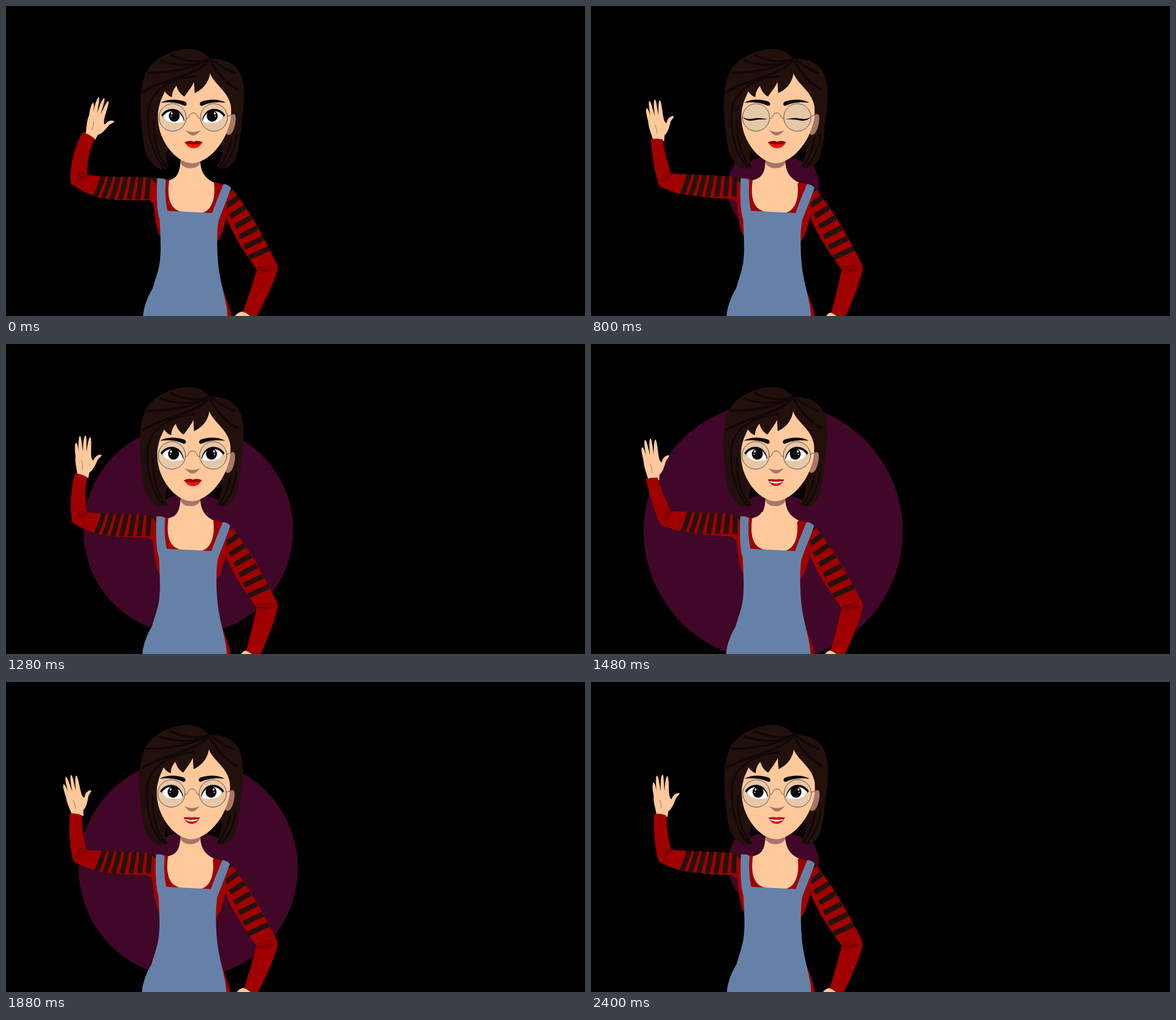
An HTML page with a canvas that plays this animation: 1022x548 px, repeating every 2440 ms.

```html
<!DOCTYPE html>
<html lang="en">
<head>
<meta charset="utf-8">
<title>Waving woman</title>
<style>
html, body { margin: 0; width: 100%; height: 100%; overflow: hidden; background: #000; }
canvas { display: block; }
</style>
</head>
<body>
<canvas id="stage" width="1022" height="548"></canvas>
<script>
const c = document.getElementById('stage').getContext('2d');
const LOOP = 2440, SWING = 1040;
const SKIN = '#ffc99c', SHADE = '#a6776a', RED = '#a00000', FOLD = '#740000';
const HAIR = '#22100c', STRAND = '#120708', STRIPE = '#22120e', INK = '#0b0608';
const APRON = '#6681a8', FRAME = '#4c372c';

const lerp = (a, b, u) => a + (b - a) * u;
const ease = u => (1 - Math.cos(Math.PI * Math.min(1, Math.max(0, u)))) / 2;

// Blend two path strings of the same structure.
function mix(a, b, u) {
  const to = b.match(/-?[\d.]+/g);
  let i = 0;
  return a.replace(/-?[\d.]+/g, n => lerp(+n, +to[i++], u).toFixed(2));
}

// Value at time t from [time, value] keys.
function track(keys, t, curve = u => u) {
  let i = 1;
  while (i < keys.length - 1 && t > keys[i][0]) i++;
  const [t0, a] = keys[i - 1], [t1, b] = keys[i];
  return lerp(a, b, curve((t - t0) / (t1 - t0)));
}

function fill(d, color) {
  c.fillStyle = color;
  c.fill(new Path2D(d));
}

function line(d, color, width) {
  c.strokeStyle = color;
  c.lineWidth = width;
  c.stroke(new Path2D(d));
}

function disc(x, y, rx, ry, color) {
  c.fillStyle = color;
  c.beginPath();
  c.ellipse(x, y, rx, ry, 0, 0, 7);
  c.fill();
}

function group(draw, ...m) {
  c.save();
  c.transform(...m);
  draw();
  c.restore();
}

function clipped(d, draw) {
  c.save();
  c.clip(new Path2D(d));
  draw();
  c.restore();
}

const growth = [[0, 0], [800, 81], [1600, 254.5], [2440, 72]];
const handTurn = [[0, 16], [320, -13], [560, -26], [800, -9], [1040, 4], [1280, 0],
  [1680, -16], [2080, -10], [2400, -3], [2440, 0]];

const sleeve = [
  'M135,223 C120,250 112,285 114,313 C125,323 148,334 165,339 C195,344 225,344 252,343 L262,350 L266,304 C235,301 170,304 143,298 C143,275 148,250 157,235 C150,229 143,225 135,223Z',
  'M88,243 C100,270 112,300 124,320 C130,322 148,328 160,329 C190,334 220,337 247,340 L258,348 L264,304 C235,297 170,296 140,295 C130,278 118,260 109,237 C102,237 95,239 88,243Z'
];
const elbowFolds = [
  'M121,310 C130,301 136,302 144,297 M125,301 C130,294 135,296 139,293 M124,311 C132,308 137,304 142,300',
  'M125,311 C132,301 136,297 143,295 M127,302 C130,296 134,295 139,292 M130,313 C134,306 138,301 142,298'
];
const lowerArm = [
  'M443,464 C436,490 426,520 418,541 C425,542 429,545 432,548 L443,548 C456,523 472,492 480,464Z',
  'M443,464 C437,490 431,520 424,543 C429,544 432,546 434,548 L450,548 C461,523 474,492 480,464Z'
];
const hipHand = ['M404,548 C408,543 413,540 420,540 L433,549Z', 'M416,548 C418,545 420,543 424,542 L436,549Z'];
const upperArm = 'M397,321 C425,353 456,410 478,456 C482,463 477,474 472,478 L444,468 C428,446 404,412 389,375 L391,340Z';

function drawHand() {
  fill('M-9,1 C-10,-12 -14,-22 -12.500,-35 C-14,-45 -14,-56 -12,-58 C-9,-58 -8,-50 -6.500,-40 C-8,-55 -7,-69 -5,-70 C-2,-70 -1.500,-55 0.500,-42 C0.500,-56 2.500,-71 5,-71 C7.500,-71 6.500,-55 7,-42 C8.500,-55 11,-68 13.500,-68 C16,-67 15,-50 15,-39 C15,-31 17,-27 19,-27 C22,-35 28,-38 33,-37 C35,-35 28,-31 26,-27 C22,-17 17,-8 12,-6 L10,4Z', SKIN);
  line('M-2,-27 C0,-22 0,-15 -1,-11', SHADE, 1);
}

function drawWavingArm(p, turn) {
  const a = turn * Math.PI / 180, cos = Math.cos(a), sin = Math.sin(a);
  group(drawHand, cos, sin, -sin, cos, lerp(149, 101, p), lerp(230, 240, p));
  const d = mix(...sleeve, p);
  fill(d, RED);
  clipped(d, () => {
    const y = lerp(300, 292, p);
    for (let i = 0; i < 7; i++) {
      const top = lerp(172, 176, p) + 13.3 * i;
      const foot = lerp(155, 162, p) + 15.5 * i;
      line(`M${top},${y} Q${lerp(top, foot, .35)},${y + 20} ${foot},${y + 42}`, STRIPE, 8.5);
    }
    line('M258,303 L267,313', STRIPE, 5);
  });
  line(mix(...elbowFolds, p), FOLD, 2);
}

function drawHipArm(p, q) {
  fill(mix(...hipHand, q), SKIN);
  fill(mix(...lowerArm, q), RED);
  const k = 4 * p / 140;
  group(() => {
    fill(upperArm, RED);
    clipped(upperArm, () => {
      for (let i = -1; i < 6; i++) {
        line(`M${412 + 10.5 * i},${337 + 18.3 * i} L${388 + 8 * i},${354 + 18.2 * i}`, STRIPE, 9);
      }
    });
  }, 1, 0, k, 1, -465 * k, 0);
  line('M445,461 C454,464 461,457 469,459 M443,466 C455,468 465,464 476,463 M446,471 C455,472 463,467 469,466', FOLD, 2.2);
}

function drawTorso() {
  fill('M262,306 C275,303 282,306 290,308 L369,312 C380,313 392,318 400,326 L388,378 C384,395 380,408 373,416 L374,470 C380,500 392,520 398,548 L280,548 L276,412 L271,405 C264,390 262,365 260,346 L254,342Z', RED);
  fill('M305,297 C302,303 296,306 288,308 C285,330 285,360 312,364 L345,366 C366,361 370,335 367,312 C357,309 351,305 348,297Z', SKIN);
  fill('M267,305 C272,304 279,305 282,308 C280,330 282,350 285,362 L364,366 C370,348 378,330 384,315 C390,315 396,319 397,322 C390,342 380,365 375,380 C372,400 372,425 374,450 C377,490 390,520 391,548 L242,548 C243,530 252,510 259,499 C267,470 272,465 273,430 C273,410 272,390 271,376 C266,360 266,330 267,305Z', APRON);
}

function drawStraps() {
  fill('M267,305 C272,304 279,305 282,308 C280,330 282,350 285,362 L271,376 C266,360 266,330 267,305Z', APRON);
  fill('M384,315 C390,315 396,319 397,322 C390,342 380,365 375,380 L364,366 C370,348 378,330 384,315Z', APRON);
}

function drawNeck() {
  fill('M308,268 L343,268 C342,291 350,304 367,312 L345,330 L305,330 L288,308 C304,304 308,290 308,268Z', SKIN);
  fill('M308,268 L343,268 L343,277 C338,290 313,290 308,277Z', SHADE);
}

function drawEye(shut) {
  disc(294, 197, 24, 24.3, '#e6c8a8');
  c.strokeStyle = FRAME;
  c.lineWidth = .9;
  c.stroke();
  fill('M273,171 C285,164 302,164 316,169 C321,172 319,178 314,176 C303,171 290,169 273,171Z', INK);
  if (shut) {
    fill('M270,196 C278,201 285,200 292,198.500 C300,197 307,199 315,200 C307,201 300,200 293,201.500 C284,204 276,203 270,196Z', INK);
    return;
  }
  fill('M274,193 C280,183 290,181 297,182 C307,184 313,192 315,203 L300,200 L279,198Z', INK);
  fill('M277,195 C283,187 290,185 297,186 C306,187.500 312,194 314,204 C304,208.500 285,209 277,195Z', '#fff');
  disc(297, 194.5, 9.7, 10, INK);
  disc(292.5, 190, 1.7, 2, '#fff');
  disc(291.5, 195, 1, 1.2, '#ccc');
}

function drawMouth(smile) {
  if (smile) {
    fill('M316,240 C322,238 327,239 330,239.500 C334,238 339,239 344,240 C341,247 336,251 330,251 C324,251 319,247 316,240Z', '#d4141b');
    fill('M318,242 C325,244 336,244 342,242 C338,248 322,248 318,242Z', '#fff');
    line('M316,240 C324,243 336,243 344,240', '#8e0008', 1.6);
  } else {
    fill('M315,241 C322,244 340,244 347,241 C343,248 337,251.500 331,251.500 C325,251.500 320,248 315,241Z', '#f5120f');
    fill('M315,241 C322,238 327,238 331,240 C336,238 341,238 347,241 C340,246 322,246 315,241Z', '#8e0000');
  }
}

function drawHead(t) {
  fill('M360,93 C350,80 335,75 318,76 C285,79 256,97 246,120 C236,145 236,180 239,205 C241,235 244,262 253,272 C260,282 268,287 276,290 L275,285 L283,290 L282,285 L289,287 C283,278 280,270 285,255 L330,200 L383,250 C383,265 378,275 371,285 L377,284 L376,288 L384,285 L383,288 C395,285 403,277 406,268 C415,240 414,220 417,200 C423,160 421,140 416,125 C408,103 390,93 360,93Z', HAIR);
  line('M360,94 C335,108 300,118 249,118 M361,93 C340,101 315,98 290,86 M361,93 C340,108 305,107 272,96', STRAND, 4);
  line('M359,97 C332,125 280,128 241,153 M362,93 C378,107 392,114 405,119 M361,97 C376,124 393,140 411,149', STRAND, 4);
  line('M335,124 C280,130 257,155 252,180 C247,220 257,260 279,285 M261,200 C260,240 268,266 285,286 M408,225 C404,255 395,272 382,286 M398,232 C394,255 386,272 377,284', STRAND, 3);

  fill('M397,192 C405,188 407,195 405,206 C403,218 399,228 392,228 L386,224Z', SHADE);
  fill('M280,151 C284,156 288,160 293,161 C293,153 296,147 301,141 C303,150 309,157 315,160 C322,150 328,143 332,134 C332,142 333,149 333,154 C345,149 358,137 360,119 C368,139 392,150 397,177 C399,200 394,213 388,227 C376,254 351,278 328,278 C303,276 283,251 274,228 C268,212 266,190 271,175 C273,165 278,158 280,151Z', SKIN);

  const shut = t >= 740 && t < 900;
  drawEye(shut);
  group(() => drawEye(shut), -1, 0, 0, 1, 661, 0);
  line('M318,199 C324,200 322,189 330.500,189 C339,189 337,200 343,199 M391,195 L402,191', FRAME, .9);
  fill('M317,219 C324,224 337,224 344,219 C339,226 334,229 330,229 C326,229 321,225 317,219Z', SHADE);
  drawMouth(t >= 1480);
}

function draw(t) {
  c.clearRect(0, 0, 1022, 548);
  const s = t % SWING;
  const p = s < 620 ? ease((s - 40) / 560) : 1 - ease((s - 630) / 410);
  const hip = Math.abs(Math.sin(Math.PI * t / SWING / 2));
  const r = track(growth, t);
  const sway = f => group(f, 1, 0, 0, 1, -4.3 * p, 0);

  disc(321.7, 317.5 + .06 * r, r, r, '#400728');
  sway(() => {
    fill('M250,150 L400,150 L384,282 C374,272 357,268 345,268 L305,268 C295,268 285,272 276,282Z', '#0b0405');
    drawTorso();
  });
  drawNeck();
  drawWavingArm(p, track(handTurn, t, ease));
  drawHipArm(p, hip);
  sway(() => {
    drawStraps();
    drawHead(t);
  });
}

const start = performance.now();
function tick() {
  draw((performance.now() - start) % LOOP);
  requestAnimationFrame(tick);
}
tick();
</script>
</body>
</html>
```
